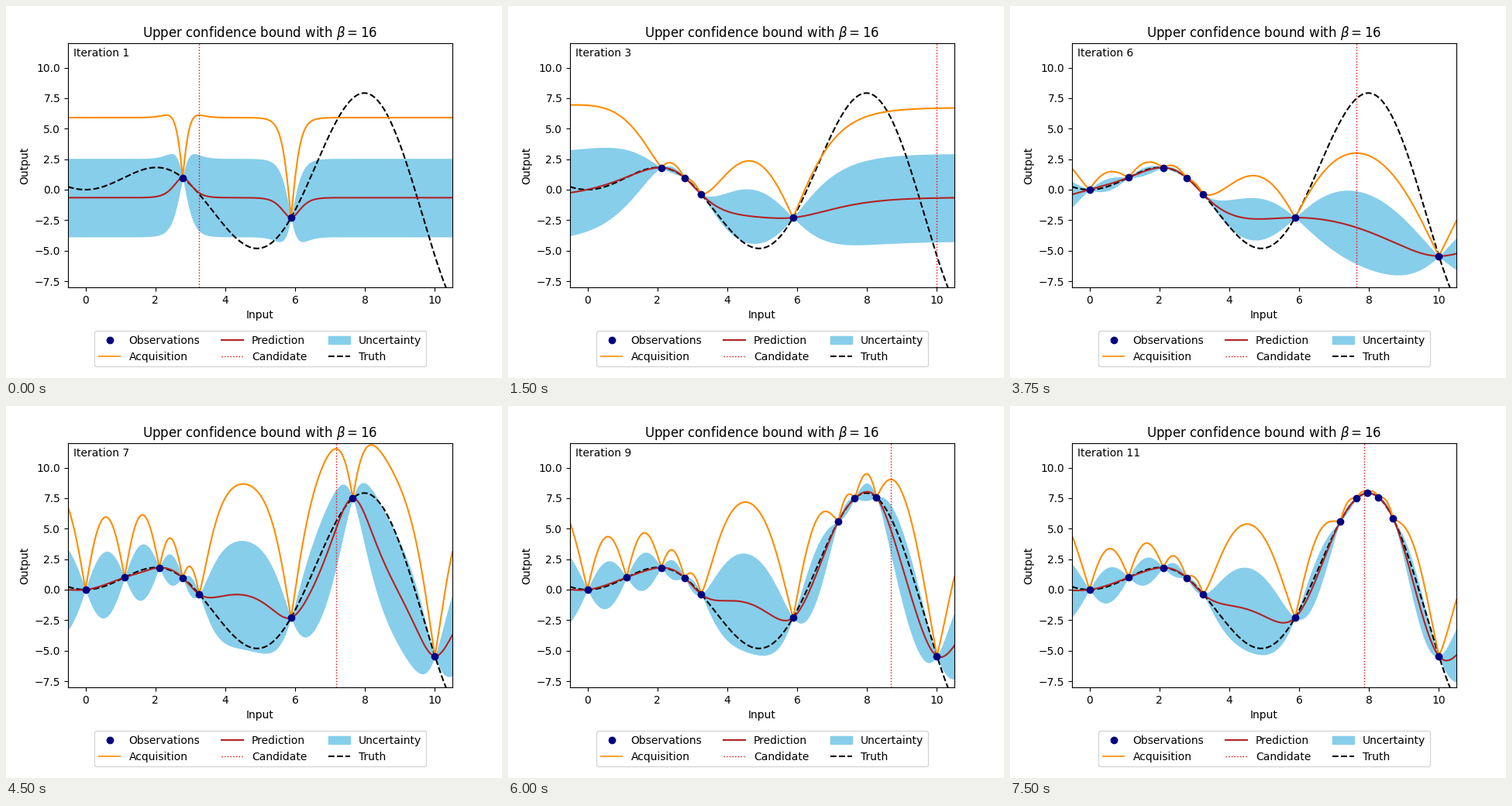
A matplotlib script that plays this animation: 640 by 480 pixels, repeating every 8 s.

```python
import numpy as np
import matplotlib.pyplot as plt
from matplotlib.animation import FuncAnimation
from matplotlib.lines import Line2D
from matplotlib.patches import Patch

plt.rcParams["font.family"] = "DejaVu Sans"

BETA = 16
START = [2.782, 5.883]
# Chosen candidate, length scale and amplitude for each iteration
STEPS = [
    (3.255, 0.291, 1.64),
    (2.117, 0.45, 1.375),
    (10.0, 1.41, 1.84),
    (0.0, 1.60, 2.10),
    (1.12, 1.70, 2.00),
    (7.65, 1.75, 1.93),
    (7.18, 0.68, 2.34),
    (8.27, 0.78, 2.31),
    (8.69, 0.87, 2.28),
    (7.96, 0.94, 2.19),
    (7.85, 1.00, 2.10),
]
TICK = 250          # ms per animation frame
TICKS_PER_STEP = 3
FRAMES = 32


def truth(x):
    return x * np.sin(x)


def matern(a, b, scale):
    u = np.sqrt(5) * np.abs(a[:, None] - b[None, :]) / scale
    return (1 + u + u**2 / 3) * np.exp(-u)


def predict(x, xs, ys, scale, amp):
    """Posterior mean and deviation of a constant-mean Gaussian process."""
    inv = np.linalg.inv(matern(xs, xs, scale) + 1e-9 * np.eye(len(xs)))
    base = (inv @ ys).sum() / inv.sum()
    k = matern(x, xs, scale)
    mean = base + k @ inv @ (ys - base)
    var = 1 - np.einsum("ij,jk,ik->i", k, inv, k)
    return mean, amp * np.sqrt(np.clip(var, 0, None))


grid = np.linspace(-0.5, 10.5, 1101)


def solve(step):
    xs = np.array(START + [s[0] for s in STEPS[:step]])
    ys = truth(xs)
    cand, scale, amp = STEPS[step]
    mean, dev = predict(grid, xs, ys, scale, amp)
    return xs, ys, cand, mean, dev


results = [solve(i) for i in range(len(STEPS))]

fig = plt.figure(figsize=(6.4, 4.8), dpi=100)
ax = fig.add_axes([0.125, 117 / 480, 0.775, 315 / 480])
ax.set(xlim=(-0.5, 10.5), ylim=(-8, 12), xlabel="Input", ylabel="Output")
ax.set_title(rf"Upper confidence bound with $\beta={BETA}$")

band = ax.fill_between(grid, 0 * grid, 0 * grid, color="skyblue", lw=0)
ax.plot(grid, truth(grid), "--", color="black")
pred, = ax.plot([], [], color="firebrick")
acq, = ax.plot([], [], color="darkorange")
line = ax.axvline(0, color="red", ls=":", lw=1)
dots, = ax.plot([], [], "o", color="navy", zorder=4)
label = ax.text(0.0135, 0.945, "", transform=ax.transAxes)

handles = [
    Line2D([], [], color="navy", marker="o", ls="none", label="Observations"),
    Line2D([], [], color="darkorange", alpha=0.8, label="Acquisition"),
    Line2D([], [], color="firebrick", label="Prediction"),
    Line2D([], [], color="red", ls=":", lw=1, label="Candidate"),
    Patch(color="skyblue", label="Uncertainty"),
    Line2D([], [], color="black", ls="--", label="Truth"),
]
ax.legend(handles=handles, ncol=3, loc="upper center",
          bbox_to_anchor=(0.5, -0.157))


def update(frame):
    step = min(frame // TICKS_PER_STEP, len(STEPS) - 1)
    xs, ys, cand, mean, dev = results[step]
    low, high = mean - 1.96 * dev, mean + 1.96 * dev
    outline = np.column_stack([np.r_[grid, grid[::-1]], np.r_[low, high[::-1]]])
    band.set_verts([outline])
    pred.set_data(grid, mean)
    acq.set_data(grid, mean + np.sqrt(BETA) * dev)
    line.set_xdata([cand, cand])
    dots.set_data(xs, ys)
    label.set_text(f"Iteration {step + 1}")
    return band, pred, acq, line, dots, label


anim = FuncAnimation(fig, update, frames=FRAMES, interval=TICK,
                     repeat=True, repeat_delay=0)
plt.show()
```
